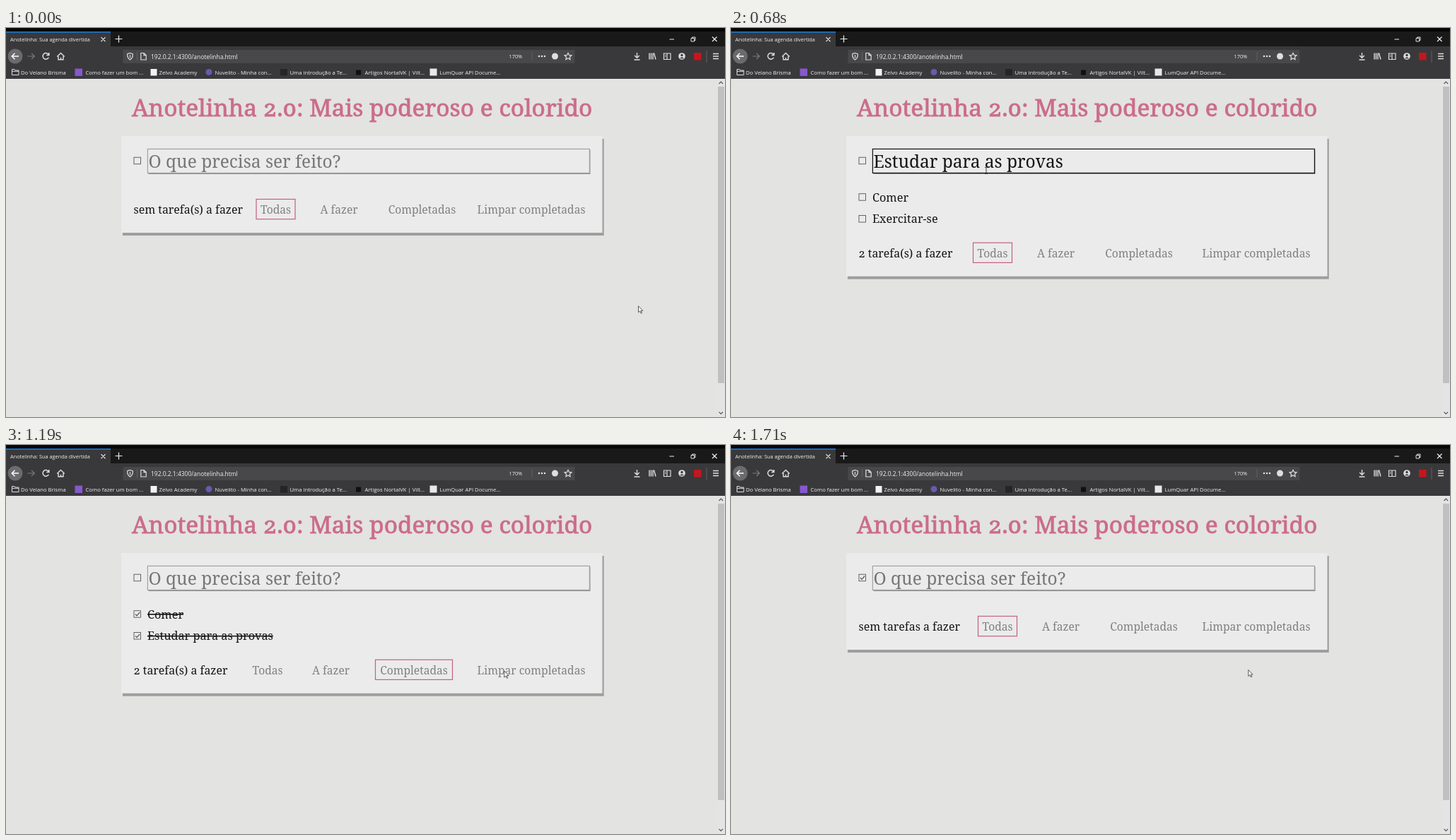
These frames come from a looping animation (1017 by 551 pixels, 2.05 s). An HTML page:

```html
<!DOCTYPE html>
<html lang="pt-BR">
<head>
<meta charset="utf-8">
<title>Lista de tarefas</title>
<style>
  html, body { margin: 0; width: 100%; height: 100%; overflow: hidden; background: #e3e3e1; }
  svg { display: block; width: 100%; height: 100%; }
  text { white-space: pre; }
  .ui { font: 7.7px "Open Sans", "Noto Sans", sans-serif; fill: #f1f1f2; }
  .ui .tab { font-size: 7.35px; }
  .ui .url { font-size: 8.45px; }
  .icon { fill: none; stroke: #dededf; stroke-width: 1.2; }
  .page { font-family: "Noto Serif", serif; font-variant-numeric: oldstyle-nums; fill: #141414; }
  .title { font-size: 33.5px; fill: #cb6c8b; stroke: #cb6c8b; stroke-width: .8; }
  .field { font-size: 24.5px; }
  .task { font-size: 16.25px; }
  .done { text-decoration: line-through; }
  .status { font-size: 15.9px; }
  .link { font-size: 15.6px; text-anchor: middle; fill: #808080; }
  .hint { fill: #767676; }
  .line { fill: none; stroke: #555; }
</style>
</head>
<body>
<svg viewBox="0 0 1017 551" preserveAspectRatio="none">
  <rect width="1017" height="551" fill="#e3e3e1"/>

  <g id="browser">
    <rect width="1017" height="27" fill="#19191a"/>
    <rect width="1017" height="5" fill="#070708"/>
    <rect y="26" width="1017" height="46" fill="#39393b"/>
    <rect y="5" width="148" height="22" fill="#39393b"/>
    <rect y="5" width="148" height="1.5" fill="#1b7de0"/>
    <rect x="165.5" y="31" width="639" height="19" rx="1" fill="#48484a"/>
    <circle cx="13" cy="40" r="10.5" fill="#6b6b6d"/>

    <g class="icon">
      <path d="M134.5 13.2l6 6m0-6l-6 6M154.5 15.5h10m-5-5v10M938.5 16h6.5M999 12.5l6.5 6.5m0-6.5l-6.5 6.5" stroke="#f0f0f0"/>
      <path d="M969 14.5h4.5v4.5h-4.5zM970.5 14.5v-1.5h4.5v4.5h-1.5" stroke-width="1"/>
      <path d="M18 40H8.500m4-4.200L8.300 40l4.200 4.200" stroke="#fff" stroke-width="1.5"/>
      <path d="M30.5 40H40m-4-4.2l4.2 4.2-4.2 4.2" stroke="#7d7d80"/>
      <path d="M60 37.5a4.3 4.3 0 1 0 .3 4.2M60.8 35v3.5h-3.5" stroke-width="1.5"/>
      <path d="M72.3 40.5l5.2-5 5.2 5M74 40v4.8h7V40M77.5 44.8v-3" stroke-width="1.4"/>
      <path d="M175.5 35.5l3.8 1.2c.2 4-.8 6.5-3.8 8.3-3-1.8-4-4.3-3.8-8.3zM175.5 38v4.5"/>
      <path d="M190.8 35.5h4.4l3 3v6.5h-7.4zM195 35.5v3.2h3.2"/>
      <path d="M795 35.3l1.5 3.1 3.4.4-2.5 2.4.6 3.4-3-1.6-3 1.6.6-3.4-2.5-2.4 3.4-.4z"/>
      <path d="M892.5 35v7m-3.4-3l3.4 3.3 3.4-3.3M888.5 45h8" stroke-width="1.4"/>
      <path d="M910 35.5v9m2.5-9v9m2.5-9v9m1.5-9l2.5 9" stroke-width="1.4"/>
      <path d="M930.5 36h9.5v8.5h-9.5zM935 36v8.5M932 38.5h1.5m-1.5 2h1.5"/>
      <path d="M1000 36.5h8m-8 3.5h8m-8 3.5h8" stroke-width="1.4"/>
      <path d="M185.5 34v12M744 34v12M991 32v17" stroke="#606063" stroke-width="1"/>
      <path d="M8.5 66.5v-8h3.5l1 1.5h5v6.5zM8.5 61.3h9.5" stroke-width="1"/>
    </g>
    <g fill="#dededf">
      <circle cx="754" cy="40" r="1.3"/><circle cx="758" cy="40" r="1.3"/><circle cx="762" cy="40" r="1.3"/>
      <circle cx="776.5" cy="40" r="4.5"/>
      <circle cx="956" cy="40" r="4.8"/>
    </g>
    <g fill="#39393b">
      <circle cx="956" cy="38.5" r="1.7"/>
      <path d="M953 43.2q3-4 6 0z"/>
    </g>
    <rect x="973" y="35" width="10.5" height="10.5" fill="#c3161d"/>

    <rect x="97.5" y="57.5" width="10.5" height="10.5" fill="#8757cf"/>
    <rect x="204.5" y="58" width="9" height="9.5" fill="#f2f2f2"/>
    <circle cx="287" cy="62.5" r="4.5" fill="#6c58ad"/>
    <rect x="388" y="58" width="10" height="9.5" fill="#252527"/>
    <rect x="495" y="59.5" width="7" height="7" fill="#101011"/>
    <rect x="599.5" y="57.5" width="10" height="10" fill="#e8e8e8"/>

    <g class="ui">
      <text class="tab" x="6" y="18.7">Anotelinha: Sua agenda divertida</text>
      <text class="url" x="205" y="43.7">192.0.2.1:4300/anotelinha.html</text>
      <text class="tab" x="711.5" y="42.9">170%</text>
      <g id="marks"></g>
    </g>
  </g>

  <g id="scrollbar">
    <rect x="1006" y="72" width="11" height="479" fill="#e4e4e4"/>
    <rect x="1007" y="83" width="9" height="420" fill="#c0c0c0"/>
    <path d="M1008.5 79l2.800-2.800 2.800 2.800M1008.5 543.800l2.800 2.800 2.800-2.800" class="line" stroke-width="1.2"/>
  </g>

  <g class="page">
    <text class="title" x="178" y="125">Anotelinha 2.0: Mais poderoso e colorido</text>
    <g id="app"></g>
  </g>
  <g id="pointer"></g>
</svg>

<script>
const $ = id => document.getElementById(id);
const LOOP = 2050, ROW = 30.85;
const HINT = 'O que precisa ser feito?';
const TWO = '2 tarefa(s) a fazer', NONE = 'sem tarefas a fazer';

// Horizontal shift of the filter links for each status width
const shifts = { 'sem tarefa(s) a fazer': 0, [NONE]: -4.5 };
const links = [
  { name: 'Todas', x: 381.5, w: 55, moves: true },
  { name: 'A fazer', x: 471, w: 64, moves: true },
  { name: 'Completadas', x: 588.5, w: 109, moves: true },
  { name: 'Limpar completadas', x: 743, w: 164 }
];

const todo = name => ({ name });
const done = name => ({ name, done: true });
const eat = 'Comer', train = 'Exercitar-se', study = 'Estudar para as provas', rest = 'Descansar';
const base = { status: 'sem tarefa(s) a fazer', tasks: [], filter: 'Todas', input: '' };
const typing = { ...base, beam: true, at: [361, 202] };

const steps = [
  { ...base, t: 0, at: [894.5, 393.8] },
  { ...base, t: 170, at: [521, 260] },
  { ...typing, t: 340, input: eat, caret: true },
  { ...typing, t: 510, input: train, caret: true, status: '1 tarefa(s) a fazer', tasks: [todo(eat)] },
  { ...typing, t: 680, input: study, status: TWO, tasks: [todo(eat), todo(train)] },
  { ...typing, t: 850, input: rest, status: '3 tarefa(s) a fazer', tasks: [eat, train, study].map(todo) },
  { ...base, t: 1020, status: TWO, tasks: [todo(train), todo(rest), done(eat), done(study)], at: [476.8, 381] },
  { ...base, t: 1190, status: TWO, tasks: [done(eat), done(study)], filter: 'Completadas', at: [704.8, 320] },
  { ...base, t: 1360, status: TWO, filter: 'Completadas', at: [704.8, 320] },
  { ...base, t: 1530, status: NONE, all: true, tasks: [done(train), done(rest)], at: [731.8, 318.5] },
  { ...base, t: 1710, status: NONE, all: true, at: [731.8, 318.5] }
];

const rect = (x, y, w, h, attrs) => `<rect x="${x}" y="${y}" width="${w}" height="${h}" ${attrs}/>`;
const text = (x, y, cls, s) => `<text x="${x}" y="${y}" class="${cls}">${s}</text>`;

function checkbox(y, on) {
  const tick = on ? `<path d="M183 ${y}l2.1 2.3 4-4.8" class="line" stroke-width="1.2"/>` : '';
  return rect(181, y - 4.8, 9.5, 9.5, 'class="line" stroke-width=".9"') + tick;
}

function panel(s) {
  const h = 137 + s.tasks.length * ROW;
  return rect(165, 157, 680.7, h, 'fill="#9e9e9e"') + rect(163, 153, 680.5, h, 'fill="#ebebeb"');
}

function field(s) {
  const edge = s.beam ? '#111' : '#a2a2a2';
  return rect(201.5, 172.5, 625, 34.5, 'fill="#8c8c8c"')
    + rect(200.4, 171.4, 625, 34, `fill="#ebebeb" stroke="${edge}" stroke-width="1.2"`)
    + text(201.5, 197.8, s.input ? 'field' : 'field hint', s.input || HINT);
}

function taskRow(task, i) {
  const y = 239.5 + i * ROW;
  return checkbox(y, task.done) + text(200, y + 6, task.done ? 'task done' : 'task', task.name);
}

function footer(s) {
  const y = 256.7 + s.tasks.length * ROW;
  const shift = shifts[s.status] ?? -11.5;
  return text(180.5, y + 6.2, 'status', s.status) + links.map(l => {
    const x = l.x + (l.moves ? shift : 0);
    const frame = l.name === s.filter
      ? rect(x - l.w / 2, y - 14.2, l.w, 28.2, 'fill="none" stroke="#c4607f" stroke-width="1.2"') : '';
    return frame + text(x, y + 6.2, 'link', l.name);
  }).join('');
}

function pointer(s) {
  const shape = s.beam
    ? '<path d="M-2-4.5h1.5l.5.5.5-.5h1.5M0-4v8M-2 4.5h1.5l.5-.5.5.5h1.5" fill="none" stroke="#333" stroke-width=".9"/>'
    : '<path d="M0 0v9l2.1-1.9 1.5 3.3 1.4-.6-1.5-3.2h2.8z" fill="#fff" stroke="#333" stroke-width=".8"/>';
  return `<g transform="translate(${s.at})">${shape}</g>`;
}

function draw(s) {
  $('app').innerHTML = panel(s) + checkbox(188, s.all) + field(s) + s.tasks.map(taskRow).join('') + footer(s);
  $('pointer').innerHTML = pointer(s);
  if (s.caret) {
    const x = 202 + $('app').querySelector('.field').getComputedTextLength();
    $('app').insertAdjacentHTML('beforeend', rect(x, 172, 1, 33, 'fill="#111"'));
  }
}

$('marks').innerHTML = [
  [21, 'Do Velano Brisma'], [112.5, 'Como fazer um bom ...'], [216.5, 'Zelvo Academy'],
  [295.5, 'Nuvelito - Minha con...'], [401.5, 'Uma introdução a Te...'],
  [507.5, 'Artigos NortalVK | Vilt...'], [613.5, 'LumQuar API Docume...']
].map(([x, s]) => text(x, 65.7, '', s)).join('');

let shown;
function tick(now) {
  const t = now % LOOP;
  const step = steps.findLast(s => s.t <= t);
  if (step !== shown) draw(shown = step);
  requestAnimationFrame(tick);
}
draw(shown = steps[0]);
requestAnimationFrame(tick);
</script>
</body>
</html>
```
